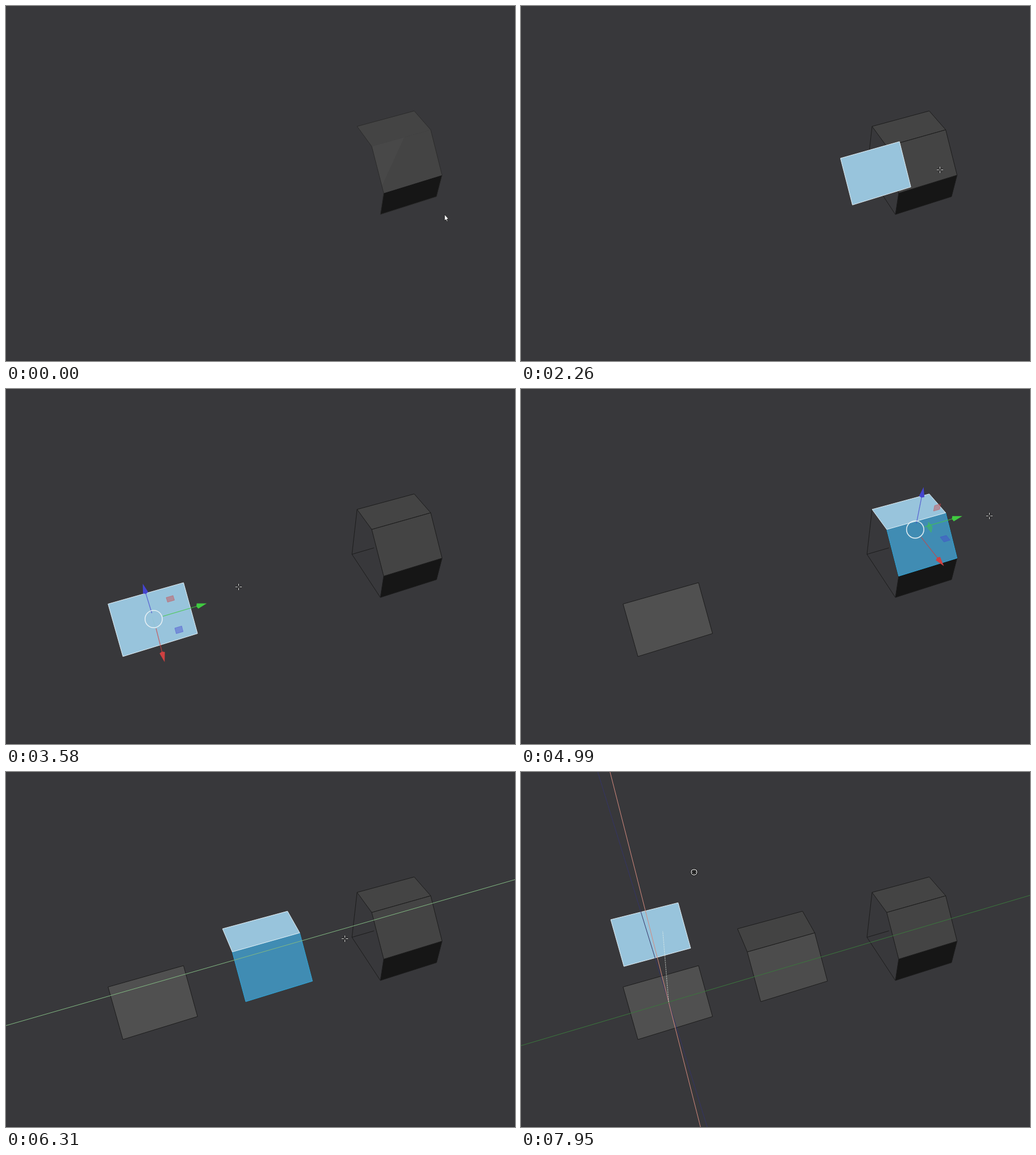
An HTML page with a canvas that plays this animation: 896 by 625 pixels, repeating every 7.99 s.

```html
<!DOCTYPE html>
<html>
<head>
<meta charset="utf-8">
<style>
html, body { margin: 0; height: 100%; overflow: hidden; background: #38383b; }
canvas { display: block; }
</style>
</head>
<body>
<canvas id="stage" width="896" height="625"></canvas>
<script>
const c = document.getElementById('stage').getContext('2d');
const LOOP = 7990;

// Camera: homogeneous screen vectors of the x, y, z axes and of the origin.
const AXES = [[.6, 48.5, -.075], [112.06, -20, .0272], [-40.4, -96, -.08]];
const ORIGIN = [609, 291, 1];

// The solid is this [x, z] profile, extruded along y from 0 to 1.
const BACK = [0, 1], RIDGE = [.485, 1], CHIN = [.985, .483], FOOT = [1, 0], HEEL = [0, 0];

const LIGHT = ['#98c4dc', '#e4eff4'], BLUE = ['#408cb3', '#2fa6d8'];
const EDGE = '#1c1c1c';
const DIM = ['#693a3e', '#3b783d', '#343467'];
const BRIGHT = ['#d48a7e', '#82b982', '#6a6ad8'];
const CONES = ['#cf4141', '#40cb40', '#4444cf'];

const homog = p => ORIGIN.map((o, i) => o + AXES.reduce((sum, a, j) => sum + a[i] * p[j], 0));
const project = p => {
  const [x, y, w] = homog(p);
  return [x / w, y / w];
};
// Screen direction of an axis seen at point p, nearly independent of depth.
const axisDir = (p, i) => {
  const [x, y] = project(p), [ax, ay, aw] = AXES[i];
  return [ax - x * aw, ay - y * aw];
};
const add = (p, q) => p.map((v, i) => v + q[i]);
const mix = (a, b, k) => a.map((v, i) => v + (b[i] - v) * k);
const centre = (...profile) => {
  const mean = i => profile.reduce((sum, p) => sum + p[i], 0) / profile.length;
  return [mean(0), .5, mean(1)];
};
const corner = ([x, z], y = 0) => [x, y, z];

const MIDDLE = centre(RIDGE, CHIN), PAIR = centre(BACK, RIDGE, CHIN);
const FAR = [0, -3.827, 0], HALF = [0, -2.143, 0];

// A grab moves freely, follows one axis from "lock", and ends after "free".
const grabs = [
  { t: 1700, lock: 2320, free: 3340, pivot: MIDDLE, travel: FAR, axis: 1 },
  { t: 5120, lock: 5400, free: 6310, pivot: PAIR, travel: HALF, axis: 1 },
  { t: 7290, lock: 7640, free: LOOP, pivot: add(MIDDLE, FAR), travel: [-1.465, 0, 0], axis: 0 }
];

const path = [
  [0, 772, 367], [420, 768, 362], [700, 768, 362], [1100, 722, 288], [1580, 826, 279],
  [1700, 818, 267], [2320, 728, 290], [2780, 589, 331], [3070, 356, 347], [3340, 356, 347],
  [3580, 408, 348], [4040, 704, 284], [4560, 684, 220], [4990, 824, 223], [5120, 831, 223],
  [5900, 597, 293], [6310, 597, 293], [6900, 280, 386], [7200, 315, 301], [7290, 315, 301],
  [LOOP, 304, 169]
];

function cursorAt(t) {
  const i = path.findIndex(p => p[0] > t), a = path[i - 1], b = path[i];
  return mix(a, b, (t - a[0]) / (b[0] - a[0])).slice(1);
}

function trace(pts, close) {
  c.beginPath();
  pts.forEach(p => c.lineTo(...p));
  if (close) c.closePath();
}

function line(pts, color, width = 1, close = false) {
  trace(pts, close);
  c.strokeStyle = color;
  c.lineWidth = width;
  c.stroke();
}

function poly(pts, fill, edge) {
  trace(pts, true);
  c.fillStyle = fill;
  c.fill();
  if (edge) line(pts, edge, 1, true);
}

function ring(x, y, r, color, width) {
  c.beginPath();
  c.arc(x, y, r, 0, 7);
  c.strokeStyle = color;
  c.lineWidth = width;
  c.stroke();
}

// One side of the solid, moved in space and then on the screen.
function quad(p, q, { world, screen } = { world: [0, 0, 0], screen: [0, 0] }) {
  return [corner(p), corner(p, 1), corner(q, 1), corner(q)]
    .map(v => add(project(add(v, world)), screen));
}

function shiftOf(g, t) {
  if (t < g.lock) return { world: [0, 0, 0], screen: g.delta };
  const end = add(g.pivot, g.travel);
  const [ax, ay] = mix(project(end), project(g.pivot), 1).map((v, i) => project(end)[i] - v);
  const [dx, dy] = g.delta;
  const k = t >= g.free ? 1 : Math.min(1, (dx * ax + dy * ay) / (ax * ax + ay * ay));
  const near = k * homog(g.pivot)[2], far = (1 - k) * homog(end)[2];
  return { world: g.travel.map(v => v * near / (near + far)), screen: [0, 0] };
}

function mesh(t) {
  const edit = t >= 420, edge = edit && EDGE;
  const top = quad(BACK, RIDGE), front = quad(RIDGE, CHIN), base = quad(CHIN, FOOT);
  if (edit) {
    const heel = project(corner(HEEL));
    line([top[0], heel, base[3]], EDGE);
    line([heel, project(corner(HEEL, .41))], EDGE);
  }
  poly(base, '#161616', edge);
  poly(top, '#444', edge);
  poly(front, '#444', edge);
  if (!edit) {
    poly([front[0], mix(front[0], front[1], .55), mix(front[0], front[3], .85)], '#484848');
    line([...top.slice(0, 3), ...base.slice(1), front[3], front[0]], '#2b2b2b', 1, true);
  }
  const both = t >= 4560;
  if ((t >= 1100 && t < 1700) || (t >= 4040 && t < 5120)) {
    poly(front, ...(both ? BLUE : LIGHT));
    if (both) poly(top, ...LIGHT);
  }
}

function copies(t) {
  const [a, b, d] = grabs;
  if (t >= a.t) {
    const picked = t < 4040 || (t >= 6900 && t < d.t);
    poly(quad(RIDGE, CHIN, shiftOf(a, t)), ...(picked ? LIGHT : ['#505050', EDGE]));
  }
  if (t >= b.t) {
    const shift = shiftOf(b, t), picked = t < 6900;
    poly(quad(RIDGE, CHIN, shift), ...(picked ? BLUE : ['#4c4c4c', EDGE]));
    poly(quad(BACK, RIDGE, shift), ...(picked ? LIGHT : ['#434343', EDGE]));
  }
  if (t >= d.t) {
    const { world, screen } = shiftOf(d, t);
    poly(quad(RIDGE, CHIN, { world: add(world, FAR), screen }), ...LIGHT);
  }
}

function guides(g, t) {
  if (t < g.lock || t >= g.free + 60) return;
  const mid = project(g.pivot), held = t < g.free;
  [2, 0, 1].forEach(i => {
    if (!held && i !== g.axis) return;
    const ends = [-14, 14].map(k => add(mid, axisDir(g.pivot, i).map(v => v * k)));
    line(ends, (i === g.axis ? BRIGHT : DIM)[i]);
  });
  if (!held) return;
  c.setLineDash([3, 1]);
  line([mid, add(mid, g.delta)], 'rgba(235,245,235,.65)');
  c.setLineDash([]);
}

function gizmo(p) {
  const mid = project(p);
  const arms = [.96, .89, .98].map((k, i) => axisDir(p, i).map(v => v * k));
  const at = (a, ka, b, kb) => mid.map((v, i) => v + a[i] * ka + b[i] * kb);
  // Plane handles fade out when seen edge-on.
  arms.forEach((_, i) => {
    const a = arms[(i + 1) % 3], b = arms[(i + 2) % 3];
    const area = Math.abs(a[0] * b[1] - a[1] * b[0]);
    c.globalAlpha = .42 * Math.min(1, area / 4000);
    poly([at(a, .33, b, .33), at(a, .46, b, .33), at(a, .46, b, .46), at(a, .33, b, .46)], CONES[i], CONES[i]);
  });
  arms.forEach((arm, i) => {
    const len = Math.hypot(...arm), u = arm.map(v => v / len), side = [-u[1], u[0]];
    const on = (along, across = 0) => at(u, along, side, across);
    c.globalAlpha = .72;
    line([on(i === 2 ? 11 : 17), on(len - 17)], CONES[i], 1.3);
    c.globalAlpha = 1;
    poly([on(len), on(len - 17, 4.8), on(len - 19), on(len - 17, -4.8)], CONES[i]);
  });
  ring(...mid, 15.2, 'rgba(240,245,248,.9)', 1.6);
}

function gizmos(t) {
  const during = (from, to, p) => t >= from && t < to && gizmo(p);
  during(1100, 1700, MIDDLE);
  during(3400, 4040, add(MIDDLE, FAR));
  during(4040, 4560, MIDDLE);
  during(4560, 5120, PAIR);
  during(6370, 6900, add(PAIR, HALF));
  during(6900, 7290, add(MIDDLE, FAR));
}

function pointer(t, [x, y]) {
  const around = [[1, 0], [-1, 0], [0, 1], [0, -1]];
  if (t < 420) {
    const arrow = [[0, 0], [0, 11], [2.4, 9], [4, 12.5], [5.6, 11.8], [4.2, 8.3], [7.2, 8]];
    poly(arrow.map(p => add(p, [x, y])), '#fff', '#222');
  } else if (grabs.some(g => t >= g.lock && t < g.free)) {
    ring(x, y, 3, '#111', 7);
    ring(x, y, 5, '#e4e4e4', 1.3);
    around.forEach(([dx, dy]) => ring(x + dx * 2.7, y + dy * 2.7, .4, '#ddd', .8));
  } else {
    x = Math.round(x) + .5;
    y = Math.round(y) + .5;
    [['#1b1b1b', 3], ['#fff', 1]].forEach(([color, width]) =>
      around.forEach(([dx, dy]) =>
        line([[x + dx * 2, y + dy * 2], [x + dx * 5.5, y + dy * 5.5]], color, width)));
  }
}

function draw(t) {
  const cursor = cursorAt(t);
  grabs.forEach(g => {
    const from = cursorAt(g.t);
    g.delta = cursor.map((v, i) => v - from[i]);
  });
  c.fillStyle = '#38383b';
  c.fillRect(0, 0, 896, 625);
  c.fillStyle = '#353538';
  c.fillRect(0, 623, 896, 2);
  mesh(t);
  copies(t);
  grabs.forEach(g => guides(g, t));
  gizmos(t);
  pointer(t, cursor);
}

const start = performance.now();
function tick() {
  draw((performance.now() - start) % LOOP);
  requestAnimationFrame(tick);
}
tick();
</script>
</body>
</html>
```
